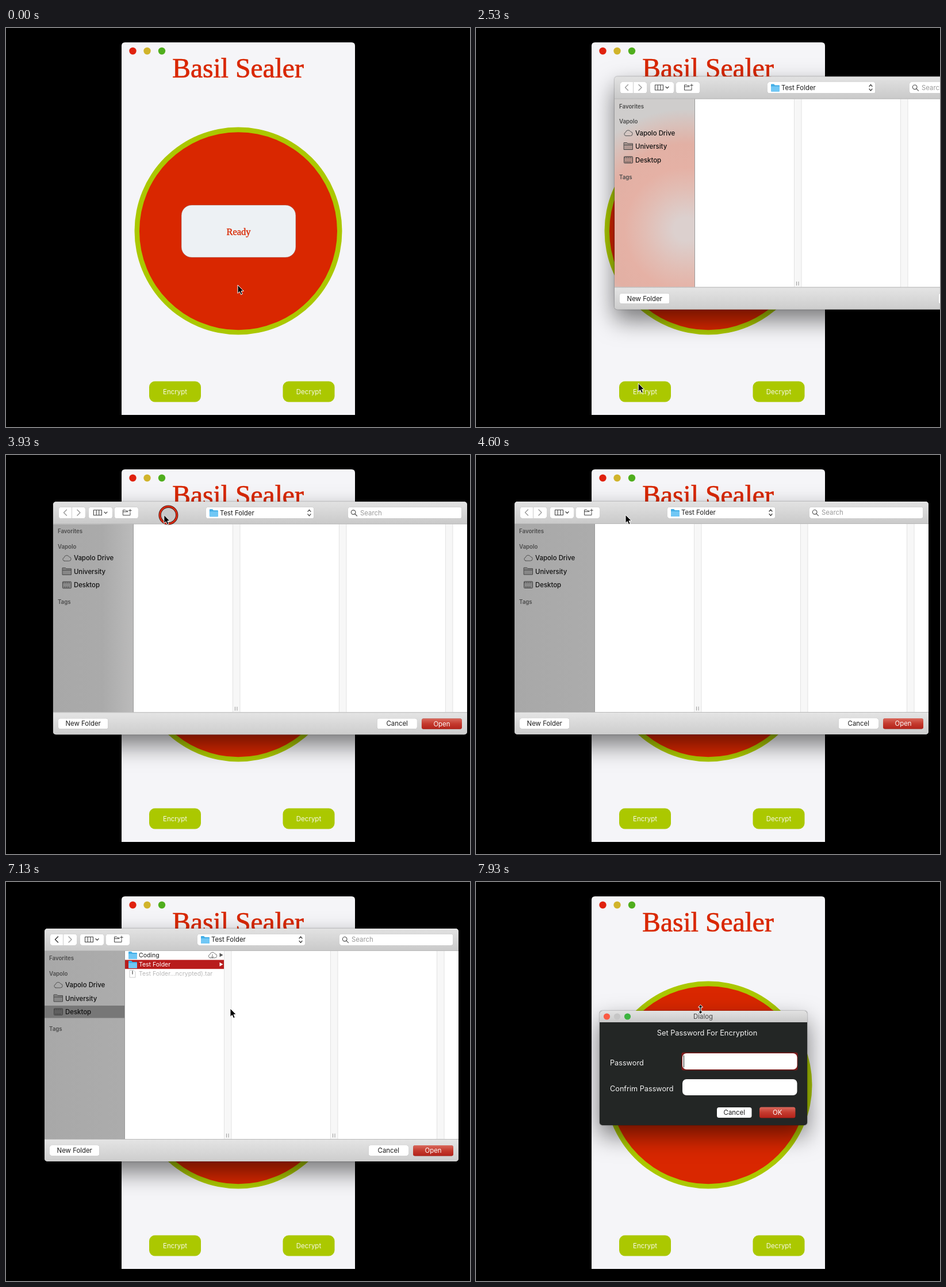
An HTML page that plays this animation: 807x694 px, repeating every 8000 ms.

```html
<!DOCTYPE html>
<html lang="en">
<head>
<meta charset="utf-8">
<title>Encrypt a folder</title>
<style>
html, body { margin: 0; width: 100%; height: 100%; overflow: hidden; background: #000; }
svg { display: block; width: 100%; height: 100%; font-family: Inter, "Open Sans", sans-serif; }
.serif { font-family: "Liberation Serif", "Noto Serif", serif; fill: #d92700; stroke: #d92700; }
.panel { filter: drop-shadow(0 0 1px rgba(0,0,0,.45)) drop-shadow(0 18px 20px rgba(0,0,0,.52)); }
.button { filter: drop-shadow(0 .5px .6px rgba(0,0,0,.45)); }
.line { fill: none; stroke-linecap: round; stroke-linejoin: round; }
.mid { text-anchor: middle; }
</style>
</head>
<body>
<svg id="stage" viewBox="0 0 807 694"></svg>
<script>
const rect = (x, y, w, h, fill, r = 0, extra = '') =>
  `<rect x="${x}" y="${y}" width="${w}" height="${h}" rx="${r}" fill="${fill}" ${extra}/>`;
const text = (x, y, s, size = 11.4, fill = '#1c1c1c', extra = '') =>
  `<text x="${x}" y="${y}" font-size="${size}" fill="${fill}" ${extra}>${s}</text>`;
const centered = (x, y, s, size, fill) => text(x, y, s, size, fill, 'class="mid"');
const dot = (x, y, r, fill) => `<circle cx="${x}" cy="${y}" r="${r}" fill="${fill}"/>`;
const line = (d, color = '#4a4a4a', width = 1.2, extra = '') =>
  `<path d="${d}" class="line" stroke="${color}" stroke-width="${width}" ${extra}/>`;
const button = (x, y, w, h, label = '', fill = '#fff', ink = '#1c1c1c') =>
  rect(x, y, w, h, fill, 3.5, 'class="button"') + centered(x + w / 2, y + h / 2 + 4.1, label, 11.4, ink);
const group = (id, body) => `<g id="${id}">${body}</g>`;
const gradient = (id, ...colors) => `<linearGradient id="${id}" x2="0" y2="1">${colors.map((c, i) =>
  `<stop offset="${i / (colors.length - 1)}" stop-color="${c}"/>`).join('')}</linearGradient>`;
const folder = (x, y) =>
  `<path d="M${x} ${y + 1}q0-1 1-1h4l2 2h7q1 0 1 1v9q0 1-1 1h-13q-1 0-1-1z" fill="#43aee6"/>` +
  rect(x, y + 4, 15, 9, '#70c7f5', 1);
const cloud = (x, y, color) =>
  line(`M${x + 4} ${y + 11}h8a3.5 3.5 0 0 0 .4-7a4.6 4.6 0 0 0-8.7 1.1a3 3 0 0 0 .3 5.9z`, color, 1);
const grip = x => line(`M${x} 438v6m3.5-6v6`, '#999', 1);
const arrowRight = (y, id) => `<path id="${id}" d="M371.5 ${y - 3.5}l6 3.5l-6 3.5z" fill="#555"/>`;

const defs = `<defs>
  ${gradient('bar', '#e2e2e2', '#c9c9c9')}
  ${gradient('foot', '#e4e4e4', '#cdcdcd')}
  ${gradient('red', '#d9695d', '#c43a2e', '#b3221a')}
  <linearGradient id="side"><stop stop-color="#a8a8a8"/><stop offset="1" stop-color="#acacac"/></linearGradient>
  <linearGradient id="glow" gradientUnits="userSpaceOnUse" x1="165" x2="240">
    <stop stop-color="#a9a9a9"/><stop offset="1" stop-color="#c4c4c4"/>
  </linearGradient>
  <radialGradient id="tint" gradientUnits="userSpaceOnUse" cx="365" cy="350" r="255">
    <stop offset=".08" stop-color="#dcd0ce"/><stop offset=".28" stop-color="#e2bdb4"/>
    <stop offset=".42" stop-color="#e5b1a5"/><stop offset=".58" stop-color="#e2b0a4"/>
    <stop offset=".72" stop-color="#d8c1bb"/><stop offset=".82" stop-color="#cfcdcc"/>
  </radialGradient>
  <clipPath id="panelClip"><rect x="67" y="81" width="720" height="405" rx="5"/></clipPath>
  <clipPath id="sideClip"><rect x="67" y="120" width="140" height="327"/></clipPath>
  <clipPath id="dialogClip"><rect x="215" y="224" width="361" height="199" rx="5"/></clipPath>
</defs>`;

const app = `<path d="M201 673V31q0-6 6-6h394q6 0 6 6v642z" fill="#f5f5f8"/>` +
  dot(220.5, 40, 6.2, '#e0220f') + dot(245.5, 40, 6.2, '#d1b42b') + dot(271, 40, 6.2, '#50ae1d') +
  text(403.5, 86, 'Basil Sealer', 47.6, '', 'class="serif mid" stroke-width=".7"') +
  dot(404, 353, 180.5, '#abc800') + dot(404, 353.2, 172, '#d92700') +
  rect(305, 308, 199, 91, '#edf1f4', 18, 'stroke="#99472f" stroke-width=".5"') +
  text(404.5, 360, 'Ready', 16.5, '', 'class="serif mid" stroke-width=".35"') +
  [[249, 'Encrypt'], [481.5, 'Decrypt']].map(([x, label]) =>
    rect(x, 614.5, 90, 36, '#abc800', 10) + centered(x + 45, 637, label, 11.5, '#f8f9e8')).join('');

const toolbar = rect(67, 81, 720, 39, 'url(#bar)') +
  button(77, 90.5, 46, 19.5) + line('M99.5 91v18.5', '#ccc', 1) +
  line('M90.5 95l-5 5l5 5', '#999', 1.4, 'id="back"') + line('M109 95l5 5l-5 5', '#999', 1.4) +
  button(129, 90.5, 41, 19.5) + line('M137.5 95.5h14v9h-14zM142.2 95.5v9M146.8 95.5v9', '#444', 1.1) +
  line('M156 98.8l2.5 2.5l2.5-2.5', '#444', 1.3) +
  button(174, 90.5, 41, 19.5) +
  line('M201 100v4.5h-12.5v-9h4l1.5 1.500h3M188.500 98.500h8.500M201 94v4.500M198.750 96.250h4.500', '#444', 1) +
  button(333, 90.5, 187.5, 19.5) + folder(339, 94) +
  text(357, 104.3, 'Test Folder', 11.4, '#1c1c1c', 'id="place"') +
  line('M510 98l2.5-3l2.5 3M510 102.5l2.5 3l2.5-3', '#444', 1.3) +
  button(580, 90.5, 197.5, 19.5) + line('M593 99.3a3.8 3.8 0 1 1-7.6 0a3.8 3.8 0 1 1 7.6 0M592 102.2l3.5 3.5', '#555') +
  text(601, 104.3, 'Search', 11.4, '#9a9a9a');

const heading = (y, s) => text(75, y, s, 9.7, '#4c4c4c', 'font-weight="600"');
const sideItem = (y, s) => text(103, y, s, 11.4, '#111', 'font-weight="500"');
const backdrop = group('backdrop',
  rect(165, 90, 300, 400, 'url(#glow)', 0, 'id="light"') + rect(200, 90, 260, 400, 'url(#tint)', 0, 'id="blush"'));
const sidebar = rect(67, 120, 140, 327, 'url(#side)') +
  `<g clip-path="url(#sideClip)">${backdrop}</g>` +
  rect(67, 215, 140, 21.5, '#777', 0, 'id="sideMark"') +
  line('M206.5 120v327', '#9b9b9b', 1) +
  heading(136, 'Favorites') + heading(162.5, 'Vapolo') + heading(259, 'Tags') +
  cloud(82.5, 173, '#555') + sideItem(183, 'Vapolo Drive') +
  line('M83.5 196h5l1.5 1.5h8.5v10.5h-15zM83.5 200h15', '#444', 1, 'style="fill:#0003"') + sideItem(206.5, 'University') +
  rect(83.5, 220, 15, 11.5, '#0003', 1, 'stroke="#444"') + line('M84 222h14M86 229.5h10', '#444', 1, 'stroke-dasharray="1.5 2"') +
  sideItem(230, 'Desktop');

const listing = rect(207, 135.5, 172, 15.7, '#b81c1c', 0, 'id="rowMark"') +
  folder(213, 121) + text(231, 131, 'Coding', 10.5) + cloud(351, 121, '#777') +
  line('M359 126v6m-2-2l2 2l2-2', '#777', 1) + arrowRight(127, 'arrowA') +
  folder(213, 137) + text(231, 147.2, 'Test Folder', 10.5, '#1c1c1c', 'id="rowText"') + arrowRight(143.3, 'arrowB') +
  line('M215.5 153.5h6.5l3 3v9.5h-9.5z', '#ccc', 1) + line('M220 155v5', '#777', 1.6) +
  text(231, 163.2, 'Test Folder…ncrypted).tar', 10.5, '#b8b8b8');

const chooser = rect(67, 81, 720, 405, '#ddd', 5, 'class="panel"') +
  `<g clip-path="url(#panelClip)">` + rect(67, 120, 720, 327, '#fff') +
  [379, 564, 749].map(x => rect(x, 120, 13, 327, '#f7f7f7') + line(`M${x}.5 120v327m12.5 0v-327`, '#e2e2e2', 1)).join('') +
  grip(383.5) + group('grip2', grip(568.5)) + toolbar + sidebar + group('listing', listing) +
  rect(67, 448, 720, 38, 'url(#foot)') + line('M67 119.5h720M67 447.5h720', '#b9b9b9', 1) + '</g>' +
  button(76, 458, 86.5, 18, 'New Folder') + button(630.5, 458, 69.5, 18, 'Cancel') +
  button(708, 458, 70, 18.5, 'Open', 'url(#red)', '#fff');

const dialog = rect(215, 224, 361, 199, '#232625', 5, 'class="panel"') +
  `<g clip-path="url(#dialogClip)">${rect(215, 224, 361, 20, 'url(#bar)')}</g>` +
  dot(227.5, 234, 5.6, '#fa5a43') + dot(245.5, 234, 5.6, '#c6c6c6') + dot(263.5, 234, 5.6, '#3db440') +
  centered(395, 238.2, 'Dialog', 11.4, '#484848') +
  centered(402, 267, 'Set Password For Encryption', 12.8, '#f2f2f2') +
  text(233, 319, 'Password', 12.7, '#f2f2f2') + text(233, 364, 'Confrim Password', 12.7, '#f2f2f2') +
  rect(357.5, 296.5, 202, 31, '#7c1a1a', 3) + rect(359, 298, 199.5, 28, '#fff', 7) +
  line('M361.5 302v20', '#222', 1) + rect(359, 343, 199.5, 28, '#fff', 7) +
  button(419, 392, 60.5, 18, 'Cancel') + button(493, 391.5, 62.5, 19, 'OK', 'url(#red)', '#fff');

const pointer = group('ring', `<circle r="14.8" fill="#c4c4c4" fill-opacity=".75" stroke="#3c1a14" stroke-width="4.4"/>` +
    `<circle r="14.8" fill="none" stroke="#dc2a12" stroke-width="2.8"/>`) +
  group('arrow', `<path d="M0 0V14.5L3.3 11.5L5.6 16.8L8.2 15.7L6 10.5H10.3Z" stroke="#fff"/>`) +
  group('resize', `<path transform="translate(390.5 221.5)" d="M0-8L4-3.5H1.2V3.5H4L0 8L-4 3.5H-1.2V-3.5H-4Z" stroke="#fff"/>`);

const stage = document.getElementById('stage');
stage.innerHTML = defs + app + group('chooser', chooser) + group('dialog', dialog) + pointer;

const LOOP = 8000;
const DRAG_START = 3640, DRAG_END = 3995;
// time, x, y of the pointer tip; eased between stops
const path = [
  [0, 403, 447], [130, 403, 447], [400, 398, 458], [870, 398, 458],
  [1660, 280, 626], [2460, 280, 626], [3400, 419, 128], [3470, 419, 128],
  [3600, 433, 108], [DRAG_START, 433, 108], [DRAG_END, 260, 104], [4650, 260, 104],
  [5180, 122, 228], [5580, 122, 228], [6130, 262, 145], [6480, 262, 145],
  [6870, 354, 191], [6930, 354, 191], [7120, 390, 220], [LOOP, 390, 220]
];
const presses = [[1860, 2060], [3610, 4060], [5280, 5470], [6270, 6440]];

const el = id => document.getElementById(id);
const clamp = v => Math.min(1, Math.max(0, v));
const ramp = (t, from, to) => clamp((t - from) / (to - from));
const ease = u => u * u * (3 - 2 * u);
const show = (id, amount) => el(id).style.opacity = Number(amount);
const move = (id, x, y) => el(id).setAttribute('transform', `translate(${x} ${y})`);
const paint = (id, attr, value) => el(id).setAttribute(attr, value);

function tipAt(t) {
  const i = Math.max(1, path.findIndex(p => p[0] >= t));
  const [t0, x0, y0] = path[i - 1], [t1, x1, y1] = path[i];
  const u = ease(ramp(t, t0, t1));
  return [x0 + (x1 - x0) * u, y0 + (y1 - y0) * u];
}

function render(t) {
  const left = 1 - ease(ramp(t, DRAG_START, DRAG_END));
  move('chooser', 174 * left, 3.5 * left);
  // the sidebar shows the blurred stage behind it, so its tint stays put
  move('backdrop', -174 * left, -3.5 * left);
  show('light', clamp(left * 10));
  show('blush', left * left);
  show('chooser', ramp(t, 2130, 2230) * (1 - ramp(t, 7540, 7640)));
  show('dialog', ramp(t, 7660, 7760));

  const onDesktop = t >= 5380, picked = t >= 6340;
  show('sideMark', onDesktop);
  show('listing', onDesktop);
  show('rowMark', picked);
  show('grip2', picked);
  paint('back', 'stroke', onDesktop ? '#333' : '#999');
  paint('rowText', 'fill', picked ? '#fff' : '#1c1c1c');
  paint('arrowB', 'fill', picked ? '#fff' : '#555');
  el('place').textContent = onDesktop && !picked ? 'Desktop' : 'Test Folder';

  const resizing = t >= 7700;
  move('arrow', ...tipAt(t));
  move('ring', ...tipAt(Math.max(0, t - 16)));
  show('ring', presses.some(([from, to]) => t >= from && t < to));
  show('arrow', !resizing);
  show('resize', resizing);
}

const start = performance.now();
function tick() {
  render((performance.now() - start) % LOOP);
  requestAnimationFrame(tick);
}
tick();
</script>
</body>
</html>
```
